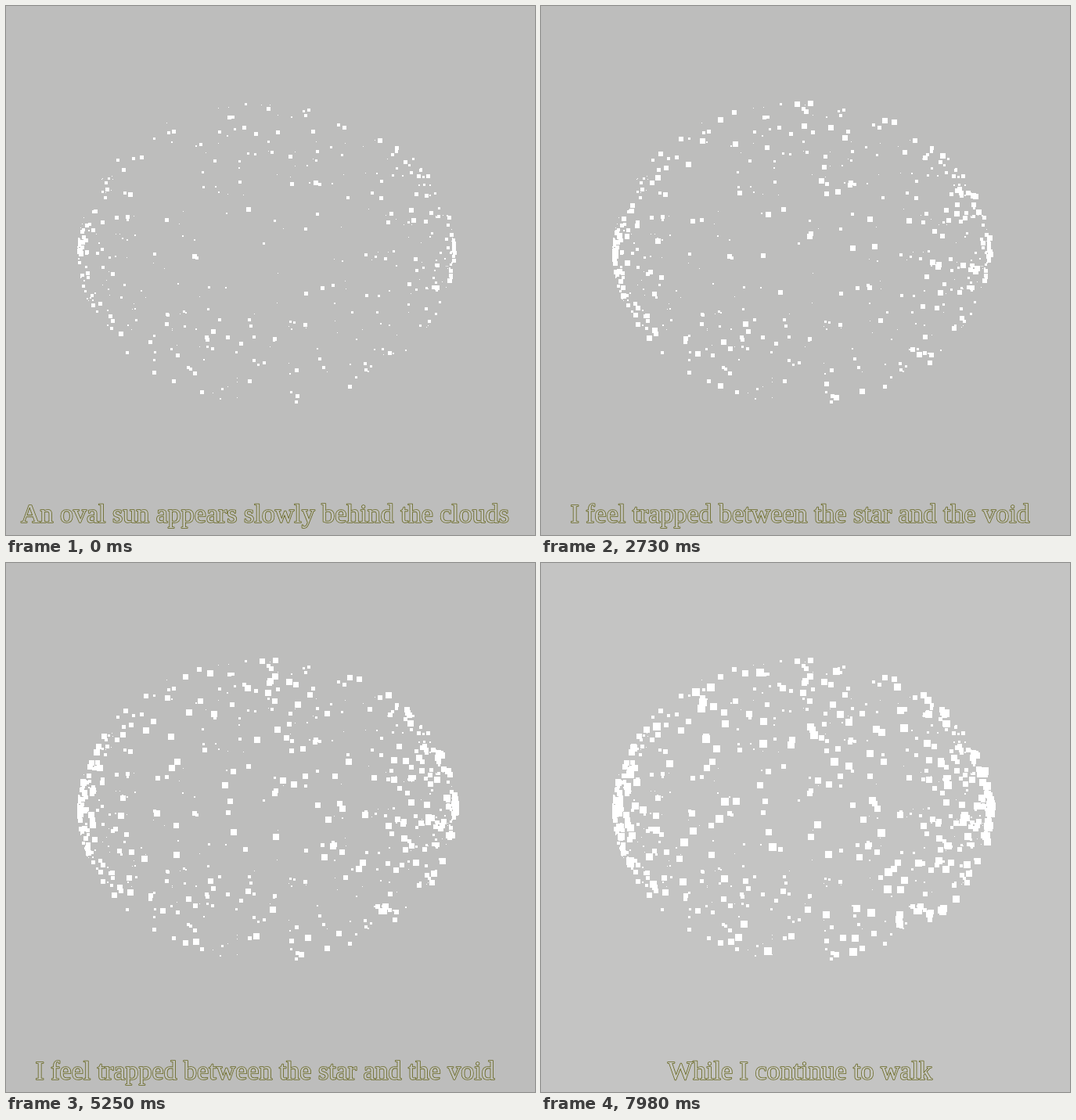
An HTML page with a canvas that plays this animation: 676 by 676 pixels, repeating every 8000 ms.

```html
<!DOCTYPE html>
<html lang="en">
<head>
<meta charset="utf-8">
<title>Oval of squares</title>
<style>
  html, body { margin: 0; width: 100%; height: 100%; overflow: hidden; background: #bdbdbc; }
  canvas { display: block; width: 676px; height: 676px; }
</style>
</head>
<body>
<canvas id="stage" width="676" height="676"></canvas>
<script>
const ctx = document.getElementById('stage').getContext('2d');
const SIZE = 676, LOOP = 8000, STEP = 70;
const CENTER_X = 331, CENTER_Y = 313, RADIUS_X = 240, RADIUS_Y = 194;
const START_COUNT = 450, PER_STEP = 3;

const captions = [
  { from: 0, text: 'An oval sun appears slowly behind the clouds' },
  { from: 420, text: 'I feel trapped between the star and the void' },
  { from: 5460, text: 'While I continue to walk' }
];

// Background and caption fill change together, without a fade.
const looks = [
  { from: 0, back: '#bdbdbc', fill: '#c1c1bd', edge: '#66661f', line: 1.6 },
  { from: 6020, back: '#c0c0c0', fill: '#ffff2e', edge: '#45450c', line: 2.4 },
  { from: 7700, back: '#c4c4c3', fill: '#c8c8c4', edge: '#66661f', line: 1.6 }
];

const current = (list, time) => list.filter(item => item.from <= time).pop();

function seededRandom(seed) {
  return () => {
    seed = (seed + 0x6D2B79F5) | 0;
    let n = Math.imul(seed ^ (seed >>> 15), 1 | seed);
    n = (n + Math.imul(n ^ (n >>> 7), 61 | n)) ^ n;
    return ((n ^ (n >>> 14)) >>> 0) / 4294967296;
  };
}

// Each square is a little larger than the one before and grows from its top left corner.
const random = seededRandom(2024);
const total = START_COUNT + PER_STEP * Math.ceil(LOOP / STEP);
const squares = Array.from({ length: total }, (_, i) => {
  const angle = random() * Math.PI;
  const height = Math.sin((random() * 2 - 1) * 1.2) / Math.sin(1.2);
  return {
    x: Math.round(CENTER_X + RADIUS_X * Math.cos(angle)),
    y: Math.round(CENTER_Y + RADIUS_Y * Math.sin(angle) * height),
    side: Math.max(1, Math.round(10 * i / total))
  };
});

function drawCaption(text, look) {
  ctx.font = '34px "Liberation Serif", serif';
  ctx.textAlign = 'center';
  ctx.lineJoin = 'round';
  ctx.lineWidth = look.line;
  ctx.strokeStyle = look.edge;
  ctx.fillStyle = look.fill;
  ctx.strokeText(text, CENTER_X, 660);
  ctx.fillText(text, CENTER_X, 660);
}

function draw(time) {
  const look = current(looks, time);
  ctx.fillStyle = look.back;
  ctx.fillRect(0, 0, SIZE, SIZE);

  const count = START_COUNT + PER_STEP * Math.floor(time / STEP);
  ctx.fillStyle = '#fff';
  for (const { x, y, side } of squares.slice(0, count)) ctx.fillRect(x, y, side, side);

  drawCaption(current(captions, time).text, look);
}

const start = performance.now();
function tick() {
  draw((performance.now() - start) % LOOP);
  requestAnimationFrame(tick);
}
tick();
</script>
</body>
</html>
```
